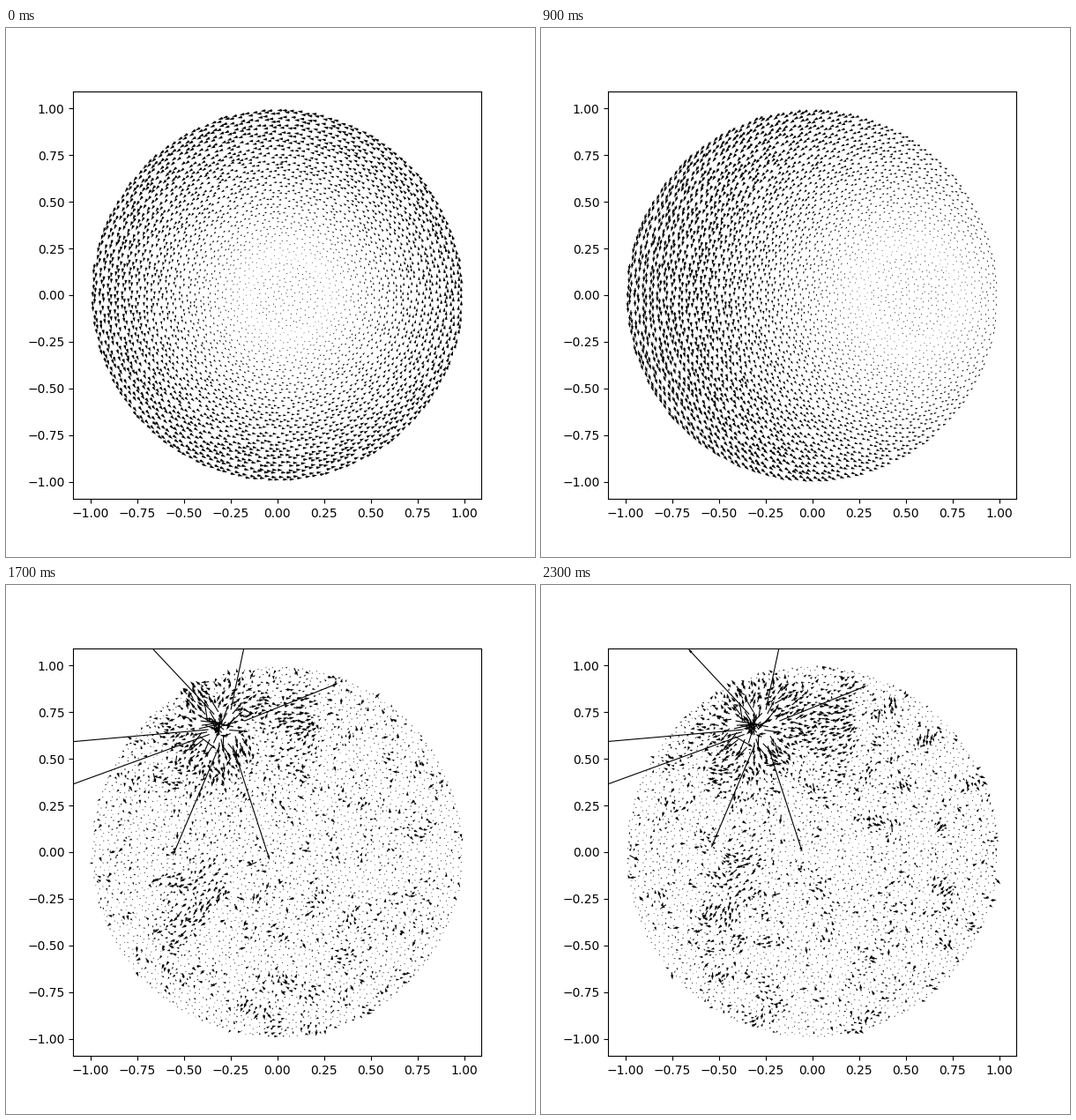
A matplotlib script for the animation above (2400 ms loop, 600x600 px).

```python
import numpy as np
import matplotlib.pyplot as plt
from matplotlib.animation import FuncAnimation
from matplotlib.tri import Triangulation

FRAMES, INTERVAL = 24, 100
RINGS = 26
MEAN_PX = 4.0              # average arrow length on screen
UNIT_PX = 211.75           # pixels per data unit
HUB = np.array([-0.32, 0.665])
SETTLE = 17                # the unstable mode is dominant from here on
SPIKES = np.radians([22, 78, 133, 185, 200, 247, 288])
rng = np.random.default_rng(7)


def polar(size, angle):
    return np.column_stack([size * np.cos(angle), size * np.sin(angle)])


def disc_mesh():
    """Centroids of an irregular triangle mesh on the unit disc."""
    nodes = [np.zeros((1, 2))]
    for k in range(1, RINGS + 1):
        a = rng.uniform(0, 2 * np.pi) + np.arange(6 * k) * np.pi / (3 * k)
        ring = polar(k / RINGS, a)
        if k < RINGS:
            ring += rng.normal(0, 0.19 / RINGS, ring.shape)
        nodes.append(ring)
    nodes = np.vstack(nodes)
    return nodes[Triangulation(*nodes.T).triangles].mean(axis=1)


def noise(p, clusters=200):
    """Fine grain plus small clusters of arrows that share a direction."""
    n = len(p)
    out = polar(rng.exponential(1.5, n), rng.uniform(0, 2 * np.pi, n))
    for _ in range(clusters):
        spot = polar(np.sqrt(rng.uniform(size=1)), rng.uniform(0, 2 * np.pi))
        push = polar(rng.uniform(2, 6, 1), rng.uniform(0, 2 * np.pi))
        width = rng.uniform(0.02, 0.06)
        out += np.exp(-((p - spot) ** 2).sum(1) / width ** 2)[:, None] * push
    return out


def stream(p, centre, length, width, tilt, push):
    """A broad elongated patch of arrows of uneven strength."""
    d = p - centre
    along = d @ (np.cos(tilt), np.sin(tilt))
    across = d @ (-np.sin(tilt), np.cos(tilt))
    w = np.exp(-(along / length) ** 2 - (across / width) ** 2)
    return (w * rng.uniform(0.3, 1.4, len(p)))[:, None] * push


def burst(p):
    """Outflow around the hub; close to it half the arrows point inwards."""
    d = p - HUB
    r = np.hypot(*d.T)
    angle = np.arctan2(d[:, 1], d[:, 0]) + rng.normal(0, 0.4, len(p))
    size = 9.5 * np.exp(-(r / 0.31) ** 2) * rng.uniform(0.4, 1.3, len(p))
    core = r < 0.11
    angle[core] += np.pi * rng.integers(0, 2, core.sum())
    size[core] = rng.uniform(8, 26, core.sum())
    return polar(size, angle)


pts = disc_mesh()
tails = HUB + (0.05, 0) + polar(0.1, SPIKES)
spike_at = [np.hypot(*(pts - t).T).argmin() for t in tails]
spike_px = UNIT_PX * (0.53 - 0.07 * np.sin(SPIKES)
                      + 1.2 * np.exp(-((SPIKES - np.radians(200)) / 0.3) ** 2))
pts[spike_at] = tails

steady = (burst(pts)
          + stream(pts, (-0.45, -0.25), 0.38, 0.13, 1.1, (-4.5, -3.2))
          + stream(pts, (0.12, 0.65), 0.38, 0.17, 1.6, (4.5, 1.2)))
noise_a, noise_b, noise_c = (noise(pts) for _ in range(3))


def rotation(i):
    cx = 0.85 - 0.79 * np.exp(-i / 10)
    v = np.column_stack([-pts[:, 1], pts[:, 0] - cx])
    return MEAN_PX * v / np.hypot(*v.T).mean()


def unstable(i):
    fade = 0.5 ** max(i - SETTLE, 0)
    turn = 0.22 * (i - SETTLE)
    v = steady + noise_a * np.cos(turn) + noise_b * np.sin(turn)
    v += 0.4 * fade * noise_c
    v[spike_at] = polar(spike_px * (1 + 0.15 * fade), SPIKES)
    return v


def field(i):
    amp = 0.14 * 3.2 ** (i - 13)
    return (rotation(i) + amp * unstable(i)) / (1 + amp)


fig, ax = plt.subplots(figsize=(6, 6), dpi=100)
ax.set_aspect("equal")
ax.set(xlim=(-1.0935, 1.0905), ylim=(-1.091, 1.091))
ticks = np.linspace(-1, 1, 9)
ax.set_xticks(ticks)
ax.set_yticks(ticks)
arrows = ax.quiver(*pts.T, *field(0).T, scale=1, scale_units="dots")


def update(i):
    arrows.set_UVC(*field(i).T)
    return (arrows,)


anim = FuncAnimation(fig, update, frames=FRAMES, interval=INTERVAL,
                     repeat=True, repeat_delay=0)
plt.show()
```
